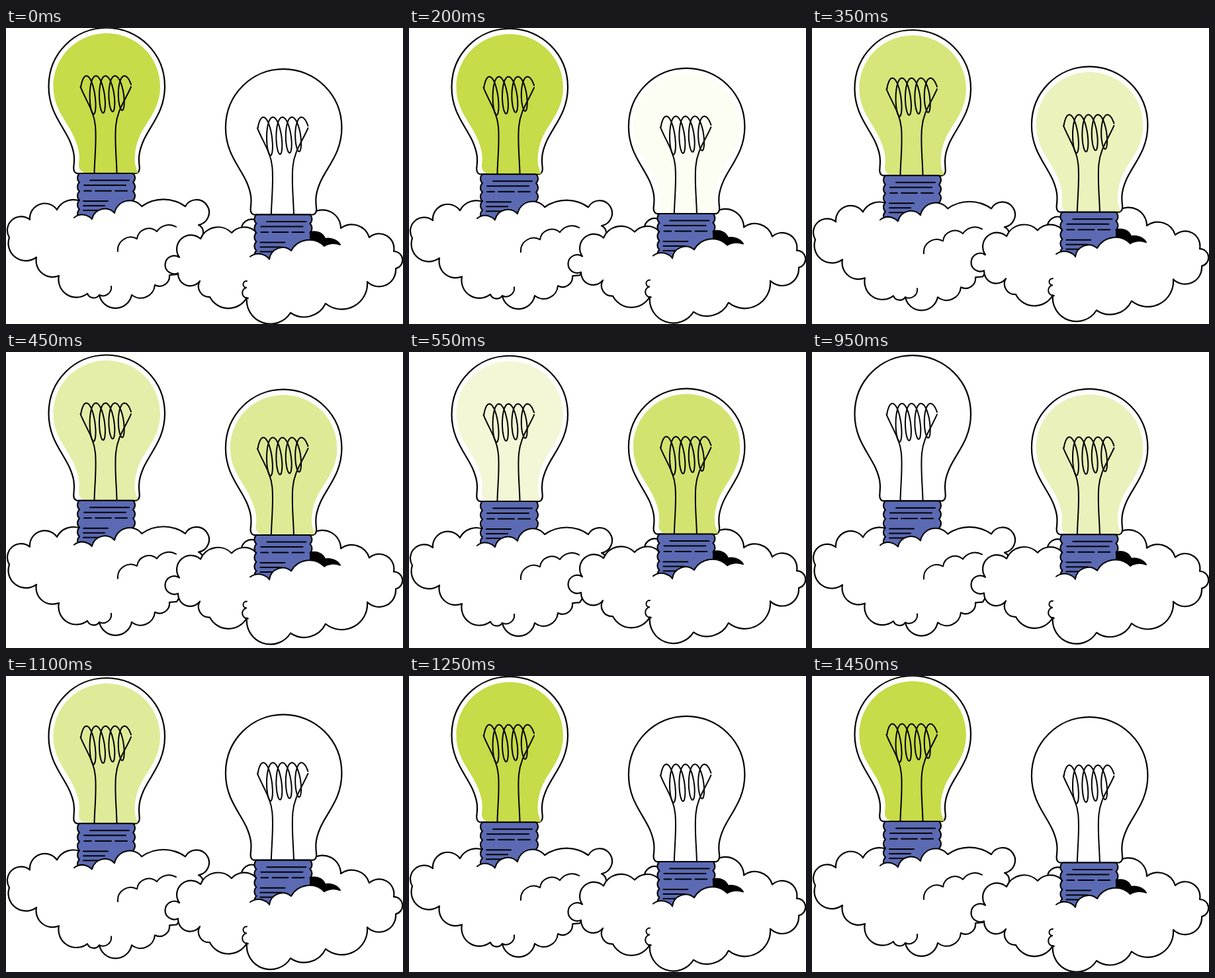
These frames come from a looping animation (600 px wide and 448 px high, 1600 ms). An HTML page:

```html
<!DOCTYPE html>
<html lang="en">
<head>
<meta charset="utf-8">
<title>Bulbs on clouds</title>
<style>
  html, body { margin: 0; width: 100%; height: 100%; overflow: hidden; background: #fff; }
  svg { display: block; width: 600px; height: 448px; }
  path { fill: none; stroke: #000; stroke-width: 2; stroke-linecap: round; stroke-linejoin: round; }
  .outline { fill: #fff; stroke-width: 2.2; }
  .patch { fill: #fff; stroke: none; }
  .glow { fill: #c8db48; stroke: none; }
  .collar { fill: #5b6ab3; }
  .black { fill: #000; }
</style>
</head>
<body>
<svg viewBox="0 0 600 448">
  <g id="left"></g>
  <g id="right"></g>
</svg>
<script>
const LOOP = 1600, STEP = 50, SWING = 1450;

const path = (d, cls = '') => `<path class="${cls}" d="${d}"/>`;

// Chain of arcs through points [x, y, bulge]; bulge is the arc's height over its chord, 0 is straight.
function lobes([x, y], ...points) {
  let d = `M${x} ${y}`;
  for (const [px, py, bulge = 0.3] of points) {
    const r = Math.hypot(px - x, py - y) * (1 / (8 * bulge) + bulge / 2);
    d += bulge ? `A${r} ${r} 0 ${+(bulge > 0.5)} 1 ${px} ${py}` : `L${px} ${py}`;
    [x, y] = [px, py];
  }
  return d;
}

// Leaning loops that drift to the right and get a little shorter.
function coil() {
  const turn = 2 * Math.PI, end = 1.1;
  let d = '';
  for (let a = -end; a <= 4 * turn + end; a += 0.1) {
    const n = a / turn, drop = 1 - Math.cos(a);
    const x = 121.5 + 14.4 * n + 7.5 * Math.sin(a) + 1.8 * drop;
    const y = 72.5 + (29.5 - n) * drop;
    d += `${d ? 'L' : 'M'}${x.toFixed(1)} ${y.toFixed(1)}`;
  }
  return d;
}

function collar() {
  const rows = 5, h = 13.6, top = 220, side = [...Array(rows + 1).keys()].map(i => top + i * h);
  const edge = lobes([111, top], [192, top, 0],
    ...side.slice(1).map(y => [192, y, 0.22]), [111, side[rows], 0],
    ...side.slice(0, rows).reverse().map(y => [111, y, 0.22]));
  return path(edge + 'Z', 'collar') +
    path('M127 230.5H186M118 238H181M118 246.5H129M135 246.5H159M165 246.5H183M117 262H154M117 269H149M117 276H152');
}

const bulb = () =>
  path('M107 220Q101 218 102.5 208C104 196 103 186 96 170C85 146 64.5 126 64.5 88.5C64.5 38 104 -.3 152 -.3S240 38 240 88.5C240 126 219 146 208 170C201 186 200 196 201.5 208Q203 218 197 220Z', 'outline') +
  path('M119 219.5Q109 216 110 206C112 194 110 182 104 168C94 142 71.5 124 71.5 88.5C71.5 43 108 8 152 8S233 43 233 88.5C233 124 211 142 201 166C195 181 194 194 195 205Q197 215 200 219.5Z', 'glow') +
  collar() +
  path('M112.5 89C122 112 133 126 135 148C137 172 134 195 133.5 219M189 89C180 110 168 124 166 148C164 172 167 195 167.5 219') +
  path(coil());

const front = (d, close) => path(d + close, 'patch') + path(d);

document.getElementById('left').innerHTML =
  path(lobes([36, 290],
    [77, 275, 0.38], [113, 262.5, 0.2], [165, 282, 0], [205, 270], [271, 270, 0.16],
    [291, 298, 0.8], [292, 320], [258, 373, 0], [247, 374, 0],
    [225, 389], [190, 404], [141, 404, 0.41], [123, 402], [80, 375, 0.35],
    [46, 347], [5, 317, 0.37], [36, 290, 0.42]
  ), 'outline') +
  bulb() +
  front(lobes([103, 287], [134, 297, 0.27]), 'H103Z') +
  front(lobes([130, 289], [164, 280], [205, 270, 0.32]), 'V300H130Z') +
  path(lobes([169, 338], [198, 319], [228, 308], [257, 301, 0.2])) +
  path(lobes([159, 391], [141, 404]));

document.getElementById('right').innerHTML =
  path(lobes([356, 307], [378, 291]), 'outline') +
  path(lobes([294, 319],
    [341, 310, 0.27], [376, 307, 0.2], [400, 345, 0], [463, 280, 0], [506, 303],
    [549, 317, 0.26], [586, 338, 0.36], [589, 364, 0.45], [546, 384, 0.35], [483, 417, 0.33],
    [430, 431, 0.23], [364, 408, 0.4], [308, 407], [293, 383], [260, 371, 0.37],
    [262, 347, 0.85], [294, 319, 0.45]
  ), 'outline') +
  `<g transform="translate(267.4 62.5)">${bulb()}</g>` +
  path('M460 309C471 306 480 312 482 319C491 317 501 321 505 328C497 325 488 326 481 330C475 324 468 321 460 321Z', 'black') +
  front(lobes([369, 346], [402, 358, 0.27]), 'V366H369Z') +
  front(lobes([398, 350], [431, 337], [481, 330, 0.25]), 'V366H398Z') +
  path(lobes([363, 393], [364, 383, 0.5])) +
  path(lobes([366, 409], [363, 393, 0.45]));

const clamp = v => Math.max(0, Math.min(1, v));
const plateau = (t, a, b, c, d) => clamp((t - a) / (b - a)) * clamp((d - t) / (d - c));

const parts = [
  { id: 'left', drift: 7, light: t => 1 - plateau(t, 240, 640, 950, 1220) },
  { id: 'right', drift: -8, light: t => 0.96 * plateau(t, 170, 640, 750, 1080) }
].map(part => {
  const group = document.getElementById(part.id);
  return { ...part, group, glow: group.querySelector('.glow') };
});
const start = performance.now();

function draw(now) {
  const t = Math.floor((Math.max(0, now - start) % LOOP) / STEP) * STEP;
  const swing = (1 - Math.cos(2 * Math.PI * Math.min(t / SWING, 1))) / 2;
  for (const { drift, light, group, glow } of parts) {
    group.setAttribute('transform', `translate(0 ${(drift * swing).toFixed(2)})`);
    glow.setAttribute('opacity', light(t).toFixed(3));
  }
  requestAnimationFrame(draw);
}
draw(start);
</script>
</body>
</html>
```
